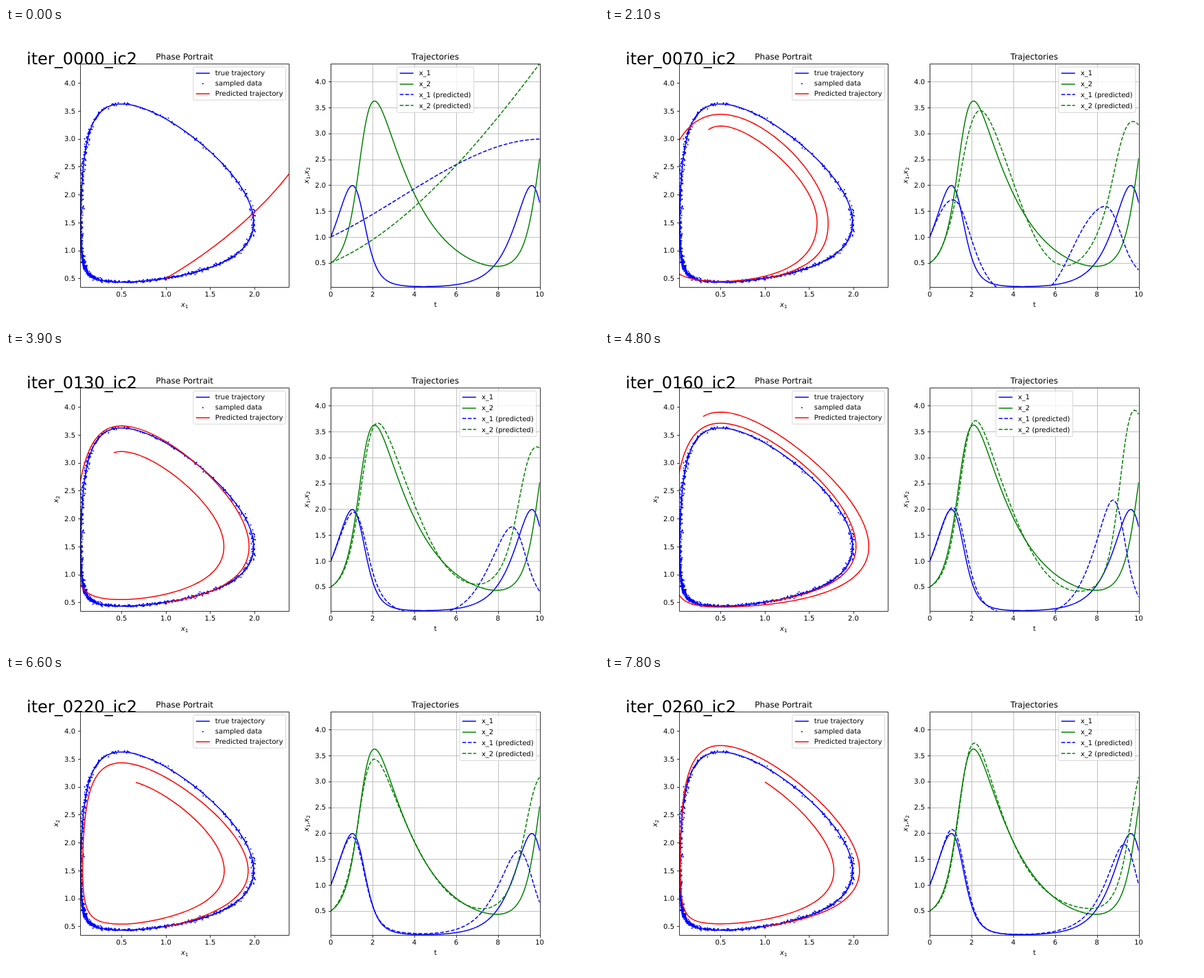
Recreate the animation shown at these times as an HTML page. Size 864 by 432 pixels, loop 8000 ms.

```html
<!DOCTYPE html>
<html lang="en">
<head>
<meta charset="utf-8">
<title>Phase portrait fit</title>
<style>
html, body { margin: 0; width: 100%; height: 100%; overflow: hidden; background: #fff; }
svg { display: block; width: 864px; height: 432px; font: 10px "DejaVu Sans", Verdana, sans-serif; text-rendering: geometricPrecision; }
path { fill: none; stroke-width: 1.5; stroke-linejoin: round; }
.axis { stroke: #000; stroke-width: .8; }
.grid { stroke: #b0b0b0; stroke-width: .8; }
.dots { stroke: #00f; stroke-width: 2; stroke-linecap: round; }
.dash { stroke-dasharray: 5.55 2.4; }
.box { fill: #fff; fill-opacity: .8; stroke: #ccc; stroke-opacity: .8; }
.mid { text-anchor: middle; }
.end { text-anchor: end; }
.title { font-size: 12px; text-anchor: middle; }
.big { font-size: 24px; }
.it { font-style: italic; }
.sub { font-size: 7px; }
</style>
</head>
<body>
<svg id="stage" viewBox="0 0 864 432"></svg>
<script>
const STEP = 300, LOOP = 8000, DT = .02;
const BLUE = '#00f', GREEN = '#008000', RED = '#f00';
const TOP = 51.84, BOTTOM = 378, WIDTH = 304.36;
const REST = [.5, 1.5];   // equilibrium of the system
const stage = document.getElementById('stage');

// Turning points (time, value) by iteration: x1 peak, x2 peak, x1 dip, x2 dip, x1 peak, x2 peak
const TURNS = {
  40: [.95, 1.36, 2.45, 2.89, 4.4, -.25, 6.6, .31, 8.57, 1.28, 10, 2.76],
  70: [1.12, 1.715, 2.42, 3.44, 4.5, -.2, 6.5, .445, 8.38, 1.59, 9.72, 3.23],
  110: [1.1, 1.88, 2.3, 3.63, 4.75, -.02, 6.95, .64, 8.6, 1.31, 9.9, 2.73],
  160: [1.1, 2.03, 2.2, 3.71, 4.47, -.05, 7.12, .415, 8.77, 2.175, 9.8, 3.91],
  220: [1.02, 1.93, 2.1, 3.43, 4.45, .06, 7.27, .54, 9, 1.66, 10.18, 3.12],
  260: [1.07, 2.07, 2.15, 3.74, 4.4, .045, 7.65, .545, 9.3, 1.78, 10.4, 3.4]
};
const ITERS = Object.keys(TURNS).map(Number);

const lerp = (a, b, u) => a + (b - a) * u;
const snap = v => Math.floor(v + .5) + .5;

// Natural cubic spline through (xs, ys)
function spline(xs, ys) {
  const n = xs.length, m = Array(n).fill(0), c = Array(n).fill(0);
  for (let i = 1; i < n - 1; i++) {
    const h = xs[i] - xs[i - 1], k = xs[i + 1] - xs[i];
    const d = 2 * (h + k) - h * c[i - 1];
    const r = 6 * ((ys[i + 1] - ys[i]) / k - (ys[i] - ys[i - 1]) / h);
    c[i] = k / d;
    m[i] = (r - h * m[i - 1]) / d;
  }
  for (let i = n - 2; i > 0; i--) m[i] -= c[i] * m[i + 1];
  return x => {
    let i = 0;
    while (i < n - 2 && x > xs[i + 1]) i++;
    const h = xs[i + 1] - xs[i], b = (x - xs[i]) / h, a = 1 - b;
    return a * ys[i] + b * ys[i + 1]
      + ((a ** 3 - a) * m[i] + (b ** 3 - b) * m[i + 1]) * h * h / 6;
  };
}

// Smooth steps between (xs, ys), constant after the last
function ramp(xs, ys) {
  return x => {
    let i = 0;
    while (i < xs.length - 2 && x > xs[i + 1]) i++;
    const u = Math.min(1, (x - xs[i]) / (xs[i + 1] - xs[i]));
    return lerp(ys[i], ys[i + 1], u * u * (3 - 2 * u));
  };
}

// Predator-prey system solved with RK4, rows of [t, x1, x2]
function solve(end) {
  const f = ([a, b]) => [1.5 * a - a * b, a * b - .5 * b];
  const add = (p, q, s) => [p[0] + q[0] * s, p[1] + q[1] * s];
  let p = [1, .5];
  const out = [[0, ...p]];
  for (let i = 1; i <= Math.round(end / DT); i++) {
    const k1 = f(p), k2 = f(add(p, k1, DT / 2)), k3 = f(add(p, k2, DT / 2)), k4 = f(add(p, k3, DT));
    p = p.map((v, j) => v + DT / 6 * (k1[j] + 2 * k2[j] + 2 * k3[j] + k4[j]));
    out.push([i * DT, ...p]);
  }
  return out;
}

const path = solve(14), truth = path.slice(0, 10 / DT + 1);

function truthAt(t) {
  const s = Math.max(0, Math.min(path.length - 1.001, t / DT)), i = Math.floor(s);
  return [1, 2].map(k => lerp(path[i][k], path[i + 1][k], s - i));
}

// The true turning points, in the same order as in TURNS
const home = [];
for (let i = 1; i < path.length - 1; i++) {
  for (const k of [1, 2]) {
    const v = path[i][k];
    if ((v - path[i - 1][k]) * (path[i + 1][k] - v) < 0) home.push([path[i][0], v]);
  }
}
home.length = 6;

// True orbit, retimed and scaled about its equilibrium to meet the given turning points
function orbit(turns) {
  const t = home.map((_, i) => turns[2 * i]);
  const r = home.map((p, i) => (turns[2 * i + 1] - REST[i % 2]) / (p[1] - REST[i % 2]));
  const clock = spline([0, ...t], [0, ...home.map(p => p[0])]);
  const scale = [
    ramp([0, t[0], t[2], t[4]], [1, r[0], r[2], r[4]]),
    ramp([0, t[0], t[1], t[3], t[5]], [1, r[1], r[1], r[3], r[5]])
  ];
  return time => truthAt(clock(time)).map((v, k) => REST[k] + (v - REST[k]) * scale[k](time));
}

// Drift of the untrained model
const untrained = t => [
  1 + .188 * t + .0184 * t ** 2 - .00183 * t ** 3,
  .5 + .17 * t + .0275 * t ** 2 - .0006 * t ** 3
];

function model(iter) {
  if (iter < ITERS[0]) {
    // The dynamics speed up during the first stretch of training
    const u = iter / ITERS[0], speed = lerp(.25, 1, u), goal = orbit(TURNS[ITERS[0]]);
    return t => {
      const g = goal(t * speed);
      return untrained(t).map((v, k) => lerp(v, g[k], u));
    };
  }
  let i = 0;
  while (i < ITERS.length - 2 && iter >= ITERS[i + 1]) i++;
  const [from, to] = [ITERS[i], ITERS[i + 1]], u = (iter - from) / (to - from);
  return orbit(TURNS[from].map((v, k) => lerp(v, TURNS[to][k], u)));
}

function el(tag, attrs, parent = stage, text) {
  const e = document.createElementNS('http://www.w3.org/2000/svg', tag);
  for (const k in attrs) e.setAttribute(k, attrs[k]);
  if (text !== undefined) e.textContent = text;
  parent.appendChild(e);
  return e;
}
const label = (x, y, text, cls = '', parent = stage) => el('text', { x, y, class: cls }, parent, text);
const curve = (parent, stroke, cls = '') => el('path', { stroke, class: cls }, parent);
const trace = pts => 'M' + pts.map(p => p[0].toFixed(2) + ' ' + p[1].toFixed(2)).join('L');

function makeAxes(left, x0, x1, y0, y1) {
  const id = 'clip' + Math.round(left);
  el('rect', { x: left, y: TOP, width: WIDTH, height: BOTTOM - TOP }, el('clipPath', { id }));
  return {
    left,
    x: v => left + (v - x0) / (x1 - x0) * WIDTH,
    y: v => BOTTOM - (v - y0) / (y1 - y0) * (BOTTOM - TOP),
    plot: el('g', { 'clip-path': `url(#${id})` })
  };
}

function drawFrame(ax, title, first, last, gap, digits) {
  const l = snap(ax.left), r = snap(ax.left + WIDTH), t = snap(TOP), b = snap(BOTTOM);
  let d = `M${l} ${t}H${r}V${b}H${l}Z`;
  for (let v = first; v <= last; v += gap) {
    d += `M${snap(ax.x(v))} ${b}v3.5`;
    label(ax.x(v), 392, v.toFixed(digits), 'mid');
  }
  for (let v = .5; v <= 4; v += .5) {
    d += `M${l} ${snap(ax.y(v))}h-3.5`;
    label(ax.left - 7, ax.y(v) + 3.7, v.toFixed(1), 'end');
  }
  el('path', { d, class: 'axis' });
  label(ax.left + WIDTH / 2, 45.8, title, 'title');
}

// Italic variables with subscripts, e.g. mathLabel('12') for x1,x2
function mathLabel(subs, transform) {
  const t = el('text', { transform, class: 'mid' });
  [...subs].forEach((s, i) => {
    if (i) el('tspan', { dy: -1.6 }, t, ',');
    el('tspan', { class: 'it' }, t, 'x');
    el('tspan', { class: 'sub', dy: 1.6 }, t, s);
  });
}

function makeLegend(width, height, pitch, rows) {
  const g = el('g', {});
  el('rect', { width, height, rx: 2, class: 'box' }, g);
  rows.forEach(([text, color, cls = ''], i) => {
    const y = 8.7 + i * pitch, mark = cls === 'dots' ? 'M14 24.2h.01' : `M4 ${Math.round(y)}h20`;
    el('path', { d: mark, stroke: color, class: cls }, g);
    label(32, y + 3.5, text, '', g);
  });
  return g;
}

// Axis limits follow the true solution
const column = k => truth.map(p => p[k]);
const lowA = .8 * Math.min(...column(1)), highA = 1.2 * Math.max(...column(1));
const lowB = .8 * Math.min(...column(2)), highB = 1.2 * Math.max(...column(2));
const phase = makeAxes(108, lowA, highA, lowB, highB);
const series = makeAxes(473.24, 0, 10, lowA, highB);

// Noisy samples
let seed = 7;
function rand() {
  seed = (seed * 16807) % 2147483647;
  return seed / 2147483647;
}
const noise = () => .013 * Math.sqrt(-2 * Math.log(rand())) * Math.cos(2 * Math.PI * rand());
let dots = '';
for (let i = 0; i < 900; i++) {
  const p = truth[Math.floor(rand() * truth.length)];
  dots += `M${phase.x(p[1] + noise()).toFixed(1)} ${phase.y(p[2] + noise()).toFixed(1)}h.01`;
}
el('path', { d: dots, class: 'dots' }, phase.plot);

let grid = '';
for (let v = 0; v <= 10; v += 2) grid += `M${snap(series.x(v))} ${TOP}V${BOTTOM}`;
for (let v = .5; v <= 4; v += .5) grid += `M${series.left} ${snap(series.y(v))}h${WIDTH}`;
el('path', { d: grid, class: 'grid' }, series.plot);

const drawPhase = (line, pts) => line.setAttribute('d', trace(pts.map(p => [phase.x(p[1]), phase.y(p[2])])));
const drawSeries = (line, pts, k) => line.setAttribute('d', trace(pts.map(p => [series.x(p[0]), series.y(p[k])])));

drawPhase(curve(phase.plot, BLUE), truth);
drawSeries(curve(series.plot, BLUE), truth, 1);
drawSeries(curve(series.plot, GREEN), truth, 2);
const fitPhase = curve(phase.plot, RED);
const fitX1 = curve(series.plot, BLUE, 'dash');
const fitX2 = curve(series.plot, GREEN, 'dash');

drawFrame(phase, 'Phase Portrait', .5, 2, .5, 1);
drawFrame(series, 'Trajectories', 0, 10, 2, 0);
mathLabel('1', 'translate(260.2 407)');
mathLabel('2', 'translate(76 215) rotate(-90)');
mathLabel('12', 'translate(441 215) rotate(-90)');
label(625.8, 407, 't', 'mid');

makeLegend(134.6, 48.2, 15, [
  ['true trajectory', BLUE], ['sampled data', BLUE, 'dots'], ['Predicted trajectory', RED]
]).setAttribute('transform', 'translate(272.8 57)');
const legend = makeLegend(112, 66.4, 15.8, [
  ['x_1', BLUE], ['x_2', GREEN], ['x_1 (predicted)', BLUE, 'dash'], ['x_2 (predicted)', GREEN, 'dash']
]);
const heading = label(30, 53, '', 'big');

function show(step) {
  const iter = step * 10, at = model(iter);
  const pts = Array.from({ length: 251 }, (_, k) => [k / 25, ...at(k / 25)]);
  drawPhase(fitPhase, pts);
  drawSeries(fitX1, pts, 1);
  drawSeries(fitX2, pts, 2);
  heading.textContent = `iter_${String(iter).padStart(4, '0')}_ic2`;
  // The legend moves to the centre when a curve would run beneath it
  const blocked = pts.some(p => p[0] > 6.17 && p[0] < 9.85 && Math.max(p[1], p[2]) > 3.4);
  legend.setAttribute('transform', `translate(${blocked ? 569.7 : 660.9} 57)`);
}

const start = performance.now();
let shown = -1;
function tick() {
  const step = Math.floor(((performance.now() - start) % LOOP) / STEP);
  if (step !== shown) show(shown = step);
  requestAnimationFrame(tick);
}
tick();
</script>
</body>
</html>
```
